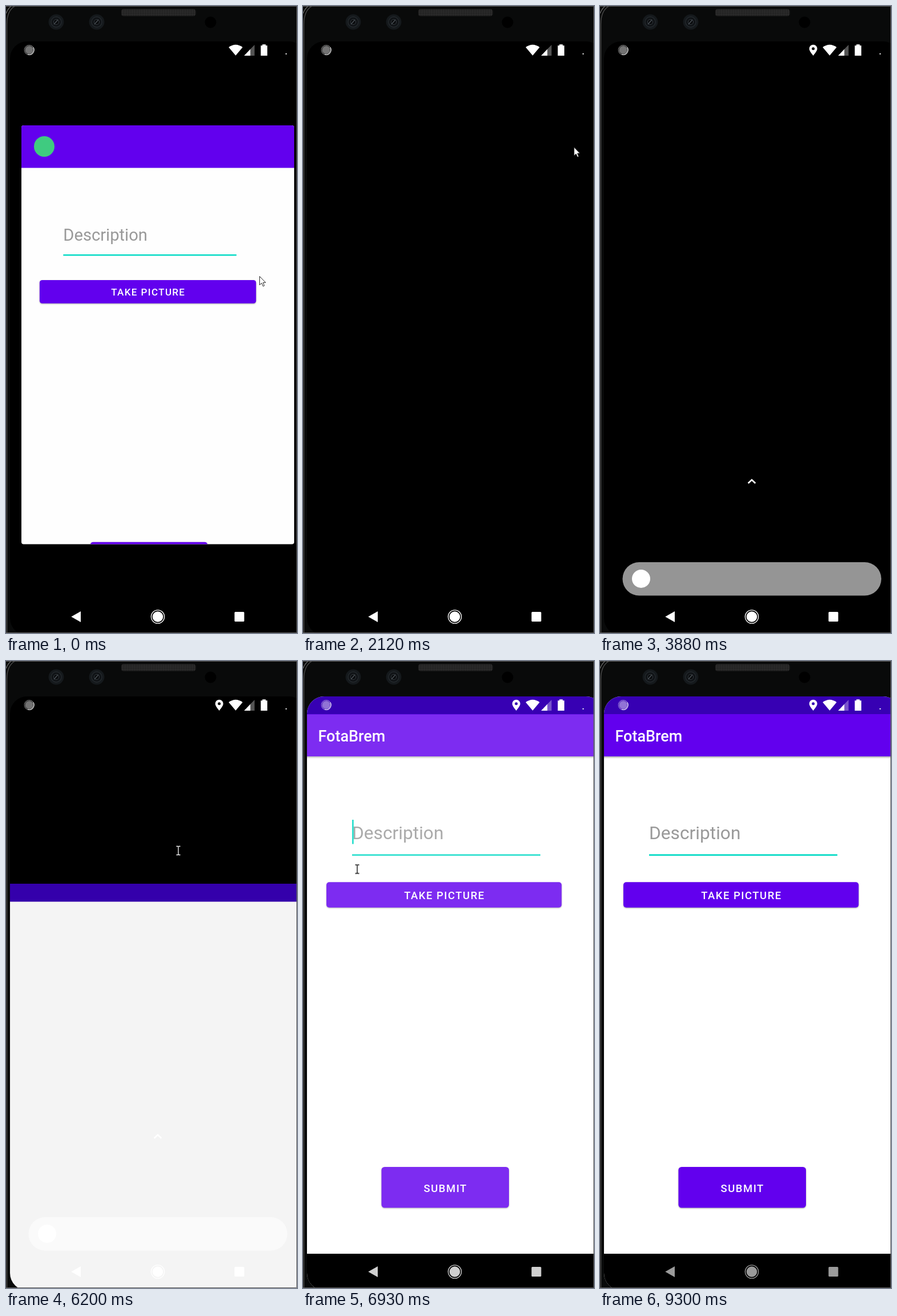
These frames come from a looping animation (510 by 1098 pixels, 9670 ms). An HTML page:

```html
<!DOCTYPE html>
<html lang="en">
<head>
<meta charset="utf-8">
<title>Phone screen</title>
<style>
html, body { margin: 0; width: 100%; height: 100%; overflow: hidden; background: #090a0a; }
svg { display: block; width: 100%; height: 100%; }
text { font-family: Roboto, sans-serif; }
.label { font-size: 18.5px; font-weight: 500; letter-spacing: 1.5px; fill: #fff; text-anchor: middle; }
.btn { fill: #6200ee; filter: drop-shadow(0 1.6px 1.2px rgba(0, 0, 0, .35)); }
#beam { mix-blend-mode: difference; }
</style>
</head>
<body>
<svg viewBox="0 0 510 1098">
  <defs>
    <clipPath id="screenClip"><rect x="7" y="62" width="519" height="1040" rx="30"/></clipPath>
    <clipPath id="cardClip"><rect x="27" y="209" width="478" height="733.5" rx="4"/></clipPath>
    <pattern id="mesh" width="3" height="3" patternUnits="userSpaceOnUse">
      <rect width="3" height="3" fill="#303030"/><circle cx="1.5" cy="1.5" r=".9" fill="#111"/>
    </pattern>
    <linearGradient id="shade" x2="0" y2="1">
      <stop stop-color="#000" stop-opacity=".32"/><stop offset="1" stop-color="#000" stop-opacity="0"/>
    </linearGradient>
    <g id="form">
      <text x="86" y="312" font-size="31.7" fill="#999">Description</text>
      <rect x="86" y="338.4" width="330" height="2.7" fill="#03dac5"/>
      <rect class="btn" x="41" y="387.3" width="412.3" height="44.5" rx="5"/>
      <text class="label" x="248" y="416.7">TAKE PICTURE</text>
      <rect class="btn" x="137.5" y="886" width="223.5" height="71.5" rx="5.5"/>
      <text class="label" x="249.7" y="929.5">SUBMIT</text>
    </g>
    <g id="camera">
      <circle r="13.4" fill="#15191c"/>
      <circle r="9" fill="#101316" stroke="#24292d" stroke-width="1.4"/>
      <circle r="4.6" fill="#0b0d0f" stroke="#343a3f"/>
      <path d="M-4 4L3-4" stroke="#4a5156" stroke-width="1.3"/>
    </g>
  </defs>

  <rect width="510" height="1098" fill="#090a0a"/>
  <path d="M1.5 1098V32Q1.5 8 16 0" fill="none" stroke="#4c4c4c" stroke-width="1.4"/>
  <path d="M0 13Q3 5 9 0" fill="none" stroke="#777" stroke-width="1.2"/>
  <rect x="202" y="5.5" width="130.5" height="12" rx="4" fill="url(#mesh)"/>
  <use href="#camera" x="88" y="28"/>
  <use href="#camera" x="159" y="28"/>
  <circle cx="358.5" cy="28.5" r="10" fill="#000"/>

  <g clip-path="url(#screenClip)">
    <rect x="7" y="62" width="519" height="1040" fill="#000"/>
    <g id="home">
      <path d="M259.7 835.8L266 829.8L272.3 835.8" fill="none" stroke="#fff" stroke-width="2.7"/>
      <rect x="39.5" y="974" width="453.5" height="58.5" rx="29.2" fill="#959595"/>
      <circle cx="72" cy="1003" r="16" fill="#fff"/>
    </g>
    <g id="card">
      <g clip-path="url(#cardClip)">
        <rect x="27" y="209" width="478" height="734" fill="#fefefe"/>
        <use href="#form" transform="translate(21.2 123.6) scale(.92)"/>
        <rect x="27" y="209" width="478" height="74.5" fill="#6200ee"/>
        <circle cx="67" cy="246" r="18" fill="#3fcb80"/>
        <path id="close" d="M459.5 238.5l16 16m0-16l-16 16" stroke="#d3bdfa" stroke-width="2.6"/>
      </g>
    </g>
    <g id="navBelow"></g>
    <g id="window">
      <rect x="7" y="62" width="519" height="1040" fill="#fff"/>
      <rect x="7" y="62" width="519" height="31.5" fill="#3700b3"/>
    </g>
    <g id="app">
      <rect x="7" y="93" width="519" height="74" fill="#6200ee"/>
      <rect x="7" y="167" width="519" height="4" fill="url(#shade)"/>
      <text x="26.5" y="140.7" font-size="27" font-weight="500" fill="#fff">FotaBrem</text>
      <use href="#form"/>
      <rect id="caret" x="86" y="278" width="2.8" height="42.5" fill="#03dac5"/>
    </g>
    <g id="bar">
      <rect x="7" y="1038" width="519" height="64" fill="#000"/>
      <g id="nav">
        <path d="M114.3 1069.5L131 1060V1079Z"/>
        <circle cx="266" cy="1069.5" r="9.3"/>
        <circle cx="266" cy="1069.5" r="11.6" style="fill:none" stroke="currentColor" stroke-width="1.4"/>
        <rect x="400.5" y="1061" width="17" height="17" rx="1.5"/>
      </g>
    </g>
    <g fill="#fff">
      <circle cx="40.7" cy="77" r="7" fill-opacity=".45"/>
      <circle cx="40.7" cy="77" r="8.2" fill="none" stroke="#fff" stroke-opacity=".55" stroke-width="1.8" stroke-dasharray="1.4 .9"/>
      <path d="M47.6 72.6A8.2 8.2 0 0 1 37.9 84.7" fill="none" stroke="#fff" stroke-opacity=".55" stroke-width="1.8"/>
      <path id="pin" fill-rule="evenodd" d="M373.7 87C369 81 366.7 77.6 366.7 74.8A7 7 0 0 1 380.7 74.8C380.7 77.6 378.4 81 373.7 87ZM373.7 72.3a2.5 2.5 0 1 0 0 5a2.5 2.5 0 1 0 0-5Z"/>
      <path d="M390.3 72.3Q402.5 63.2 414.7 72.3L402.5 86.7Z"/>
      <path d="M417.3 87L428.3 75.6V87Z"/>
      <path d="M428.3 75.6L435.6 68V87H428.3Z" opacity=".33"/>
      <path d="M446.5 69.3H449.3V67.3H455.2V69.3H458V87H446.5Z"/>
      <rect x="489.8" y="83" width="2.4" height="1.6"/>
    </g>
  </g>

  <path d="M0 .5H509.5V1097.5H0" fill="none" stroke="#5a5a5a"/>
  <path id="arrow" d="M.5.5V15.5L4 12.2L6.5 17.8L8.8 16.8L6.4 11.3H11Z" fill="#fff" stroke="#111" stroke-width=".9"/>
  <path id="beam" d="M-3.5-7.5H-1L0-6.8L1-7.5H3.5M0-6.8V6.8M-3.5 7.5H-1L0 6.8L1 7.5H3.5" fill="none" stroke="#fff" stroke-width="1.3"/>
</svg>
<script>
const LOOP = 9670;
const parts = {};
for (const id of ['home', 'card', 'close', 'navBelow', 'window', 'app', 'caret', 'bar', 'nav', 'pin', 'arrow', 'beam'])
  parts[id] = document.getElementById(id);
parts.navBelow.innerHTML = parts.nav.innerHTML;
tint(parts.navBelow, '#fff');

// The screen only refreshes at these moments.
const run = (from, to) => {
  const out = [];
  for (let t = from; t <= to; t += 120) out.push(t);
  return out;
};
const ticks = [...run(0, 1320), 1850, 1970, ...run(2120, 2360), ...run(2500, 2740), 3880, 6200,
  ...run(6330, 7290), 7530, 7770, 8140, ...run(8290, 8650), 8800, 9300];

// Linear track through rows of [time, ...values].
function track(t, rows) {
  const i = rows.findIndex(r => r[0] > t);
  if (i === 0) return rows[0].slice(1);
  if (i < 0) return rows[rows.length - 1].slice(1);
  const a = rows[i - 1], b = rows[i], k = (t - a[0]) / (b[0] - a[0]);
  return a.slice(1).map((v, n) => v + (b[n + 1] - v) * k);
}

const arrowPath = [[0, 444, 473], [360, 431, 436], [840, 463, 292], [1080, 475, 257],
  [1200, 474.5, 251], [1320, 474.5, 246.8], [2120, 474.5, 246.8], [2360, 9, 159]];
const beamPath = [[6200, 302, 332], [6810, 130, 358], [6930, 95, 364.5], [7770, 95, 364.5],
  [8140, 82, 349], [8290, 66, 450], [8410, 96, 690], [8530, 220, 920], [8650, 345, 1086]];

function show(el, alpha) {
  el.style.display = alpha > 0 ? '' : 'none';
  el.setAttribute('opacity', alpha);
}
function move(el, x, y) {
  el.setAttribute('transform', `translate(${x} ${y})`);
}
function tint(el, color) {
  el.setAttribute('fill', color);
  el.setAttribute('color', color);
}
const within = (t, a, b) => +(t >= a && t < b);

function draw(now) {
  const t = ticks.filter(v => v <= now).pop();

  const [ax, ay] = track(t, arrowPath);
  show(parts.arrow, within(t, 0, 2500));
  move(parts.arrow, ax, ay);
  show(parts.close, +(ay < 283));

  const [slide, cardAlpha] = track(t, [[1850, 0, 1], [1970, 150, .7], [2120, 480, 0]]);
  show(parts.card, cardAlpha);
  move(parts.card, slide, 0);

  show(parts.home, t < 6570 ? track(t, [[2380, 0], [2740, 1]])[0] : 0);
  show(parts.pin, +(t >= 3880));

  const [wy, wAlpha] = track(t, [[6200, 328, .957], [6330, 110, .985], [6450, 20, 1], [6570, 0, 1]]);
  show(parts.window, t < 6200 ? 0 : wAlpha);
  move(parts.window, 0, wy);

  const [appAlpha] = track(t, [[6690, 0], [6810, .42], [6930, .83], [7050, 1]]);
  show(parts.app, appAlpha);
  show(parts.bar, +(appAlpha > 0));
  const grey = Math.round(track(t, [[6810, 236], [6930, 208], [7290, 164], [7530, 155]])[0]);
  tint(parts.nav, `rgb(${grey},${grey},${grey})`);
  show(parts.caret, within(t, 6690, 7290) || within(t, 7770, 8290) || within(t, 8800, 9300));

  const [bx, by] = track(t, beamPath);
  show(parts.beam, within(t, 6200, 8800));
  move(parts.beam, bx, by);
}

function frame() {
  draw(performance.now() % LOOP);
  requestAnimationFrame(frame);
}
frame();
</script>
</body>
</html>
```
